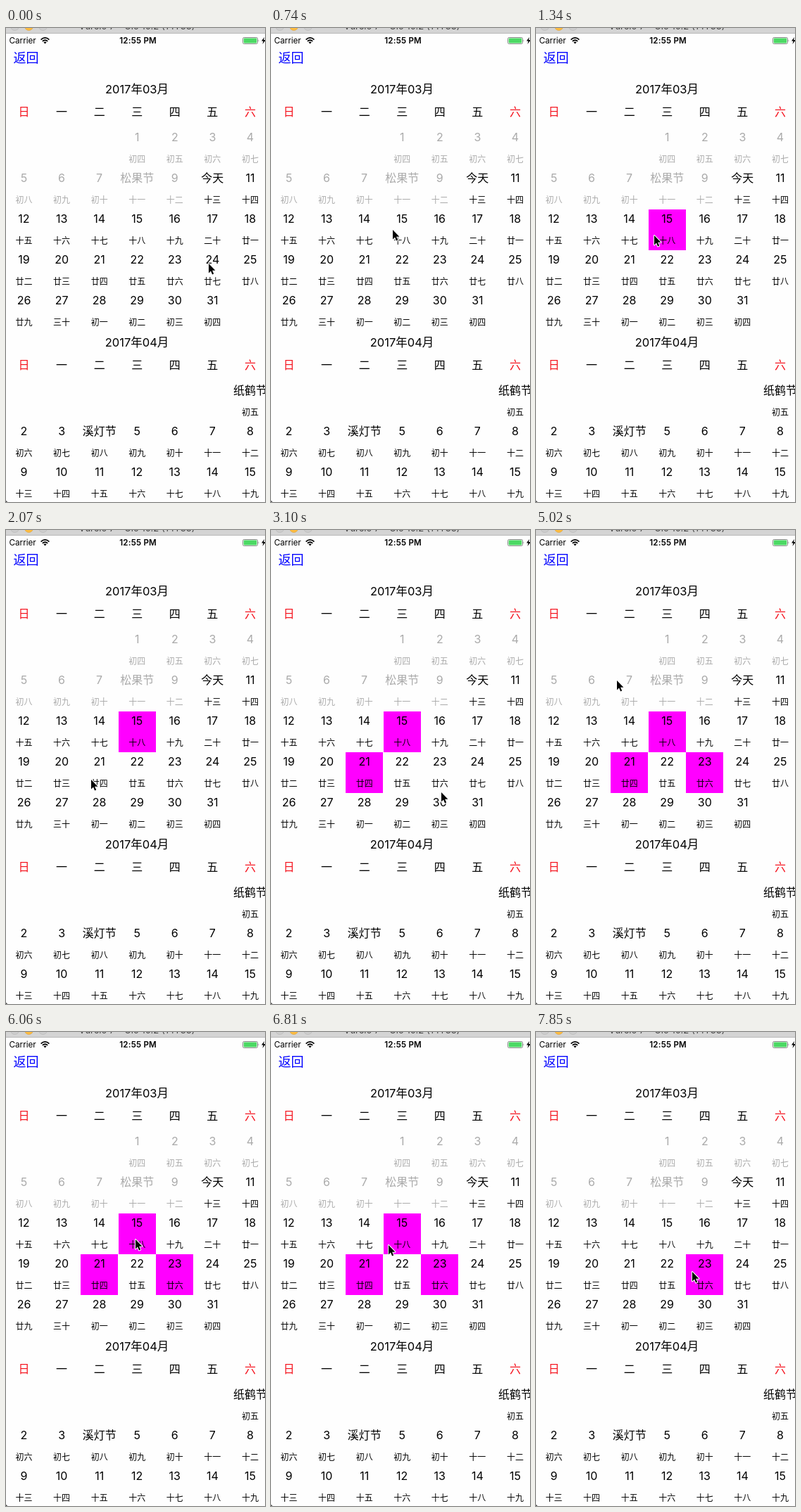
An HTML page that plays this animation: 368 by 674 pixels, repeating every 8 s.

```html
<!DOCTYPE html>
<html lang="zh-CN">
<head>
<meta charset="utf-8">
<title>Calendar</title>
<style>
  html, body { margin: 0; width: 100%; height: 100%; overflow: hidden; background: #fefefe; }
  svg { display: block; }
  text { font: 16px Inter, "Noto Sans CJK SC", "Noto Sans CJK", sans-serif; text-anchor: middle; }
  .title { font-size: 16.5px; }
  .lunar { font-size: 12px; }
  .past { fill: #aaa; }
  .weekend { fill: #f5121d; }
  .back { font-size: 18px; fill: #00f; text-anchor: start; }
  .carrier { font-size: 11.7px; text-anchor: start; }
  .clock { font-size: 11.6px; font-weight: 600; letter-spacing: .2px; }
  .window { font-size: 13px; fill: #444; }
</style>
</head>
<body>
<svg width="368" height="674" viewBox="0 0 368 674">
  <rect width="368" height="7" fill="#d4d4d4"/>
  <rect y="7" width="368" height="1" fill="#b9b9b9"/>
  <g fill="#cdcdcd" stroke="#b4b4b4" stroke-width=".6">
    <circle cx="12.5" cy="-2.5" r="6"/>
    <circle cx="32.5" cy="-2.5" r="6" fill="#fdbc40" stroke="#de9f34"/>
    <circle cx="52.5" cy="-2.5" r="6"/>
  </g>
  <text class="window" x="186" y="2">Vurelo 7 – Ulo 10.2 (14T33)</text>

  <text class="carrier" x="4.5" y="22">Carrier</text>
  <g fill="none" stroke="#000" stroke-width="1.7">
    <path d="M49.6 16.6Q55.5 11.2 61.4 16.6M51.8 18.9Q55.5 15.6 59.2 18.9"/>
    <path d="M53.4 20.2Q55.5 18.6 57.6 20.2L55.5 22.6Z" fill="#000" stroke="none"/>
  </g>
  <text class="clock" x="187.6" y="22">12:55 PM</text>
  <rect x="336.5" y="13.5" width="21" height="9" rx="1.8" fill="none" stroke="#8c8c8c"/>
  <rect x="337.7" y="14.6" width="18.6" height="6.8" rx=".8" fill="#4cd964"/>
  <path d="M358.6 16.2q1.6 1.8 0 3.6z" fill="#777"/>
  <path d="M367 13L363 18.5H365.6L364.4 23L369 17H366.2Z"/>
  <text class="back" x="10.5" y="49">返回</text>

  <g id="marks" fill="#f0f"></g>
  <g id="months"></g>
  <path d="M0 671.5Q.4 673.4 2.5 674H0Z" fill="#333"/>
  <path id="cursor" d="M0 0V13.4L3 10.6L5.1 15.5L7.2 14.6L5.1 9.8H9.4Z"
        stroke="#fff" stroke-width="2" stroke-linejoin="round" paint-order="stroke"/>
</svg>
<script>
const LOOP = 8000, COL = 375 / 7, ROW = 58;
const $ = id => document.getElementById(id);

function add(parent, tag, attrs, content = '') {
  const el = document.createElementNS('http://www.w3.org/2000/svg', tag);
  for (const key in attrs) el.setAttribute(key, attrs[key]);
  el.textContent = content;
  return parent.appendChild(el);
}

const label = (content, x, y, style = '') =>
  add($('months'), 'text', { x, y, class: style }, content);
const colX = col => 25.5 + col * COL;

function lunarName(n) {
  const day = (n - 1) % 30 + 1;
  if (day === 20) return '二十';
  if (day === 30) return '三十';
  return '初十廿'[Math.floor((day - 1) / 10)] + '一二三四五六七八九十'[(day - 1) % 10];
}

function drawMonth({ title, top, firstCol, days, lunarStart, today = 0, special }) {
  label(title, 186, top + 93, 'title');
  [...'日一二三四五六'].forEach((name, col) =>
    label(name, colX(col), top + 125, col % 6 ? '' : 'weekend'));
  for (let day = 1; day <= days; day++) {
    const slot = firstCol + day - 1;
    const x = colX(slot % 7), y = top + 142 + Math.floor(slot / 7) * ROW;
    const tone = day < today ? 'past' : '';
    label(special[day] || day, x, y + 19, tone);
    label(lunarName(lunarStart + day - 1), x, y + 49, 'lunar ' + tone);
  }
}

drawMonth({ title: '2017年03月', top: 0, firstCol: 3, days: 31, lunarStart: 4,
  today: 10, special: { 8: '松果节', 10: '今天' } });
drawMonth({ title: '2017年04月', top: 360, firstCol: 6, days: 15, lunarStart: 5,
  special: { 1: '纸鹤节', 4: '溪灯节' } });

// Selected cells: column, row, time on, time off
const marks = [[3, 2, 1190, 7100], [2, 3, 2220, 7550], [4, 3, 3250, LOOP]]
  .map(([col, row, on, off]) => ({
    on, off,
    el: add($('marks'), 'rect', {
      x: Math.round(col * COL - 1), y: 142 + row * ROW, width: 53, height: ROW
    })
  }));

// Pointer moves: first and last step time, step count, waypoints [step, x, y]
const home = [288, 335];
const moves = [
  { from: 150, to: 740, steps: 5, path: [[2, 258, 348], [4, 182, 296], [5, 173, 287]] },
  { from: 1190, to: 2220, steps: 8, path: [[1, 173, 287], [3, 163, 303], [6, 126, 348], [7, 121, 355], [8, 121, 358]] },
  { from: 2370, to: 3250, steps: 7, path: [[1, 124, 359], [4, 220, 375], [6, 242, 373], [7, 242, 373]] },
  { from: 3550, to: 4430, steps: 7, path: [[1, 240, 366], [4, 185, 265], [5, 168, 222], [7, 179, 195]] },
  { from: 4720, to: 5020, steps: 3, path: [[1, 165, 199], [3, 115, 214]] },
  { from: 5320, to: 5470, steps: 2, path: [[2, 73, 215]] },
  { from: 5910, to: 6060, steps: 2, path: [[2, 184, 295]] },
  { from: 6360, to: 6810, steps: 4, path: [[2, 153, 320], [4, 167, 303]] },
  { from: 7100, to: 7850, steps: 6, path: [[1, 167, 303], [3, 140, 343], [4, 142, 346], [6, 222, 341]] }
];

function along(start, path, step) {
  let prev = [0, ...start];
  for (const next of path) {
    if (step <= next[0]) {
      const k = (step - prev[0]) / (next[0] - prev[0]);
      return [1, 2].map(i => Math.round(prev[i] + (next[i] - prev[i]) * k));
    }
    prev = next;
  }
  return prev.slice(1);
}

function pointerAt(t) {
  let pos = home;
  for (const { from, to, steps, path } of moves) {
    if (t < from) break;
    const gap = (to - from) / (steps - 1);
    const step = Math.min(steps, 1 + Math.floor((t - from + 5) / gap));
    pos = along(pos, path, step);
  }
  return pos;
}

const start = performance.now();
function draw() {
  const t = (performance.now() - start) % LOOP;
  for (const { el, on, off } of marks)
    el.setAttribute('visibility', t >= on && t < off ? 'visible' : 'hidden');
  $('cursor').setAttribute('transform', `translate(${pointerAt(t)})`);
  requestAnimationFrame(draw);
}
draw();
</script>
</body>
</html>
```
